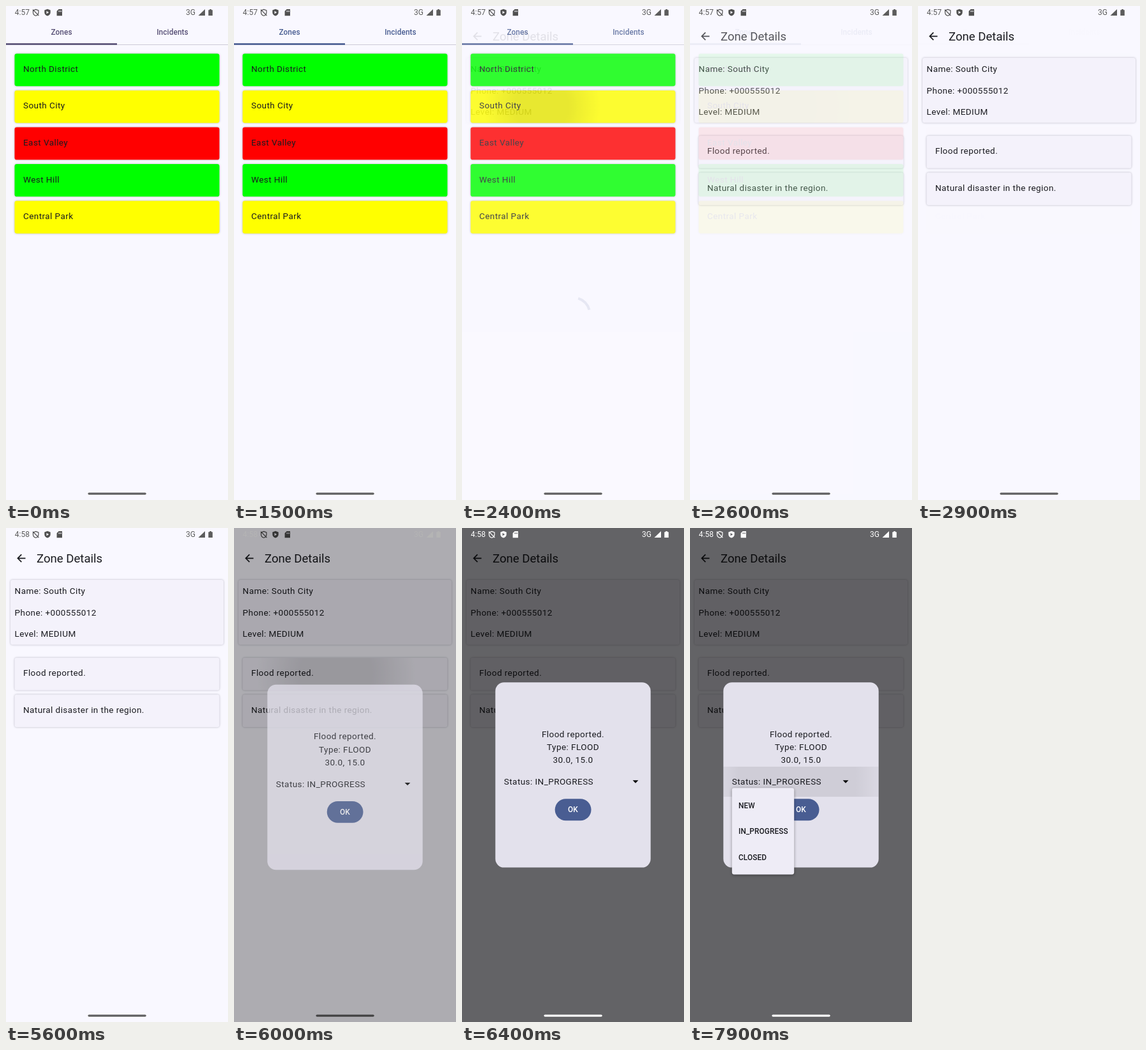
Animation of 348x772 px, one loop 8 s. Source, as an HTML page:

```html
<!DOCTYPE html>
<html lang="en">
<head>
<meta charset="utf-8">
<title>Zones</title>
<style>
  html, body { margin: 0; width: 100%; height: 100%; overflow: hidden; background: #f9f8ff; }
  svg { display: block; width: 348px; height: 772px; }
  text { font: 13.54px Roboto, sans-serif; letter-spacing: .42px; fill: #1a1b20; }
  .title { font-size: 18.6px; letter-spacing: 0; }
  .label { font-size: 11.85px; font-weight: 500; letter-spacing: .085px; }
  .clock { font-size: 12px; letter-spacing: 0; fill: inherit; }
  .mid { text-anchor: middle; }
  .card { filter: drop-shadow(0 .9px 1.6px rgba(40, 40, 60, .32)); }
  .menu { filter: drop-shadow(0 1.5px 2px rgba(0, 0, 0, .4)); }
</style>
</head>
<body>
<svg viewBox="0 0 348 772">
  <defs>
    <radialGradient id="soft">
      <stop offset=".45" stop-opacity=".1"/>
      <stop offset="1" stop-opacity="0"/>
    </radialGradient>
    <linearGradient id="press">
      <stop offset="0" stop-opacity=".05"/>
      <stop offset=".1" stop-opacity=".09"/>
      <stop offset=".85" stop-opacity=".09"/>
      <stop offset="1" stop-opacity=".04"/>
    </linearGradient>
    <clipPath id="southClip"><rect x="13.5" y="132" width="321" height="50.8" rx="3.4"/></clipPath>
    <clipPath id="floodClip"><rect x="13.5" y="203" width="321" height="50.8" rx="3.4"/></clipPath>
  </defs>
  <rect width="348" height="772" fill="#f9f8ff"/>

  <g id="list">
    <g id="tabs">
      <text class="label mid" x="87" y="44.5" style="fill:inherit">Zones</text>
      <text class="label mid" x="261" y="44.5" style="fill:inherit">Incidents</text>
      <rect y="60" width="348" height=".9" fill="#c9c7d3"/>
      <rect y="58.2" width="174" height="2.6"/>
    </g>
    <g id="zones"></g>
    <circle id="southRipple" cx="125" cy="157" fill="url(#soft)" clip-path="url(#southClip)"/>
  </g>

  <g id="details">
    <rect width="348" height="772" fill="#f9f8ff"/>
    <path d="M30.5 47.3H18.6M24.3 41.4l-5.9 5.9 5.9 5.9" fill="none" stroke="#1a1b20" stroke-width="1.7"/>
    <text class="title" x="48" y="53.7">Zone Details</text>
    <rect class="card" x="7" y="81" width="334" height="101.5" rx="3.4" fill="#f4f2fb"/>
    <text x="13.6" y="102.8">Name: South City</text>
    <text x="13.6" y="136.5">Phone: +000555012</text>
    <text x="13.6" y="170.3">Level: MEDIUM</text>
    <path id="spinner" d="M174 455.5a26.5 26.5 0 0 1 22 11.7" fill="none" stroke="#495d92" stroke-width="4"/>
    <g id="reports"></g>
    <circle id="floodRipple" cx="160" cy="228" fill="url(#soft)" clip-path="url(#floodClip)"/>
  </g>

  <rect id="scrim" width="348" height="772"/>

  <g id="dialog">
    <rect x="52.3" y="241.2" width="243.4" height="289.4" rx="13.5" fill="#e3e1ec"/>
    <text class="mid" x="174" y="326.8">Flood reported.</text>
    <text class="mid" x="174" y="347">Type: FLOOD</text>
    <text class="mid" x="174" y="367.3">30.0, 15.0</text>
    <rect id="rowPress" x="52.3" y="373" width="243.4" height="47" fill="url(#press)"/>
    <text x="65.8" y="401.2">Status: IN_PROGRESS</text>
    <path id="arrow" d="M267.6 394.3h8.8l-4.4 4.4z"/>
    <rect x="145.7" y="423.3" width="56.8" height="33.9" rx="16.95" fill="#495d92"/>
    <text class="label mid" x="174" y="444.4" style="fill:#fff">OK</text>
  </g>

  <g id="menu">
    <rect class="menu" x="65.8" y="406.2" width="97.4" height="135.2" rx="3.4" fill="#eeecf6"/>
  </g>

  <g id="sides">
    <text id="clock" class="clock" x="13.8" y="14.3"></text>
    <text class="clock" x="282" y="14.2">3G</text>
    <path d="M312 5v10h-10.5z"/>
    <path d="M317.3 6.3h1.9V5h2.7v1.3h1.9V15h-6.5z"/>
  </g>
  <g id="icons">
    <path d="M46.7 5.4l4.2 1.6v3.2c0 2.2-1.7 4.2-4.2 5-2.5-.8-4.2-2.8-4.2-5V7zM42 5.6l9.4 9.4" fill="none" stroke="currentColor" stroke-width="1.2"/>
    <path fill-rule="evenodd" d="M65 4.8l4.7 1.8v3.6c0 2.5-2 4.6-4.7 5.3-2.7-.7-4.7-2.8-4.7-5.3V6.600zM63.500 7.700v4.600l3.700-2.300z"/>
    <path fill-rule="evenodd" d="M82.700 5h5.300v10.200h-8.400V8.100zM82.300 7.200v2h1v-2zM84.100 7.200v2h1v-2zM85.900 7.200v2h1v-2z"/>
  </g>
  <rect id="homeBar" x="128.400" y="760.400" width="91.400" height="3.300" rx="1.650"/>
</svg>
<script>
const LOOP = 8000, STEP = 100;
const $ = id => document.getElementById(id);

const card = (y, fill, label) =>
  `<rect class="card" x="13.5" y="${y}" width="321" height="50.8" rx="3.4" fill="${fill}"/>
   <text x="27" y="${y + 28.5}">${label}</text>`;

const LOW = '#0f0', MEDIUM = '#ff0', HIGH = '#f00';
$('zones').innerHTML = [
  ['North District', LOW], ['South City', MEDIUM], ['East Valley', HIGH],
  ['West Hill', LOW], ['Central Park', MEDIUM]
].map(([name, fill], i) => card(74.4 + 57.55 * i, fill, name)).join('');

$('reports').innerHTML = ['Flood reported.', 'Natural disaster in the region.']
  .map((label, i) => card(202.8 + 57.55 * i, '#f4f2fb', label)).join('');

$('menu').innerHTML += ['NEW', 'IN_PROGRESS', 'CLOSED']
  .map((label, i) => `<text class="label" x="76" y="${437.6 + 40.6 * i}">${label}</text>`).join('');

// Piecewise linear value through [time, value] points.
function track(t, ...points) {
  if (t <= points[0][0]) return points[0][1];
  for (let i = 1; i < points.length; i++) {
    const [t0, a] = points[i - 1], [t1, b] = points[i];
    if (t < t1) return a + (b - a) * (t - t0) / (t1 - t0);
  }
  return points[points.length - 1][1];
}

// cubic-bezier(.4, 0, .2, 1), solved by bisection
function standardEase(x) {
  if (x <= 0) return 0;
  if (x >= 1) return 1;
  let lo = 0, hi = 1, s;
  for (let i = 0; i < 20; i++) {
    s = (lo + hi) / 2;
    const at = 1.2 * s * (1 - s) ** 2 + 0.6 * s * s * (1 - s) + s ** 3;
    if (at < x) lo = s; else hi = s;
  }
  return s * s * (3 - 2 * s);
}

const mix = (a, b, k) => `rgb(${a.map((v, i) => Math.round(v + (b[i] - v) * k))})`;
const gray = v => `rgb(${[v, v, v].map(Math.round)})`;
const set = (id, attrs) => {
  for (const name in attrs) $(id).setAttribute(name, attrs[name]);
};

function render(t) {
  const nav = standardEase((t - 2275) / 700);
  set('tabs', { fill: mix([88, 80, 118], [73, 93, 146], track(t, [0, 0], [900, 1])) });
  set('list', { opacity: 1 - nav });
  set('southRipple', { r: track(t, [2100, 0], [2200, 45], [2400, 92], [2700, 190]) });

  set('details', { opacity: nav });
  const loaded = t >= 2600;
  set('spinner', { opacity: loaded ? 0 : 1, transform: `rotate(${(t - 2400) * 0.27 + 18} 174 482)` });
  set('reports', { opacity: loaded ? 1 : 0 });
  set('floodRipple', {
    r: track(t, [5900, 0], [6000, 125], [6200, 260]),
    opacity: track(t, [6200, 1], [6400, 0])
  });

  const shown = track(t, [5900, 0], [6000, .74], [6100, 1]);
  set('scrim', { opacity: track(t, [5900, 0], [6000, .305], [6100, .54], [6200, .6]) });
  set('dialog', {
    opacity: shown,
    transform: `translate(0 ${track(t, [6000, 3.6], [6100, .6], [6200, 0])})`
  });

  set('rowPress', { opacity: track(t, [7700, 0], [7800, .6], [7900, 1]) });
  set('arrow', { transform: `translate(${t >= 7900 ? -28 : 0} 0)` });
  const scale = track(t, [7700, .8], [7800, .92], [7900, 1]);
  set('menu', {
    opacity: track(t, [7700, 0], [7800, .6], [7900, 1]),
    transform: `translate(65.8 406.2) scale(${scale}) translate(-65.8 -406.2)`
  });

  $('clock').textContent = t < 5000 ? '4:57' : '4:58';
  set('sides', { fill: gray(track(t, [5900, 92], [6000, 180], [6200, 255])) });
  const icon = gray(track(t, [5900, 80], [6000, 52], [6100, 200], [6200, 255]));
  set('icons', { fill: icon, color: icon });
  set('homeBar', { fill: gray(track(t, [5900, 96], [6000, 66], [6100, 200], [6200, 255])) });
}

const start = performance.now();
function tick() {
  const t = (performance.now() - start) % LOOP;
  render(Math.floor(t / STEP) * STEP);
  requestAnimationFrame(tick);
}
tick();
</script>
</body>
</html>
```
